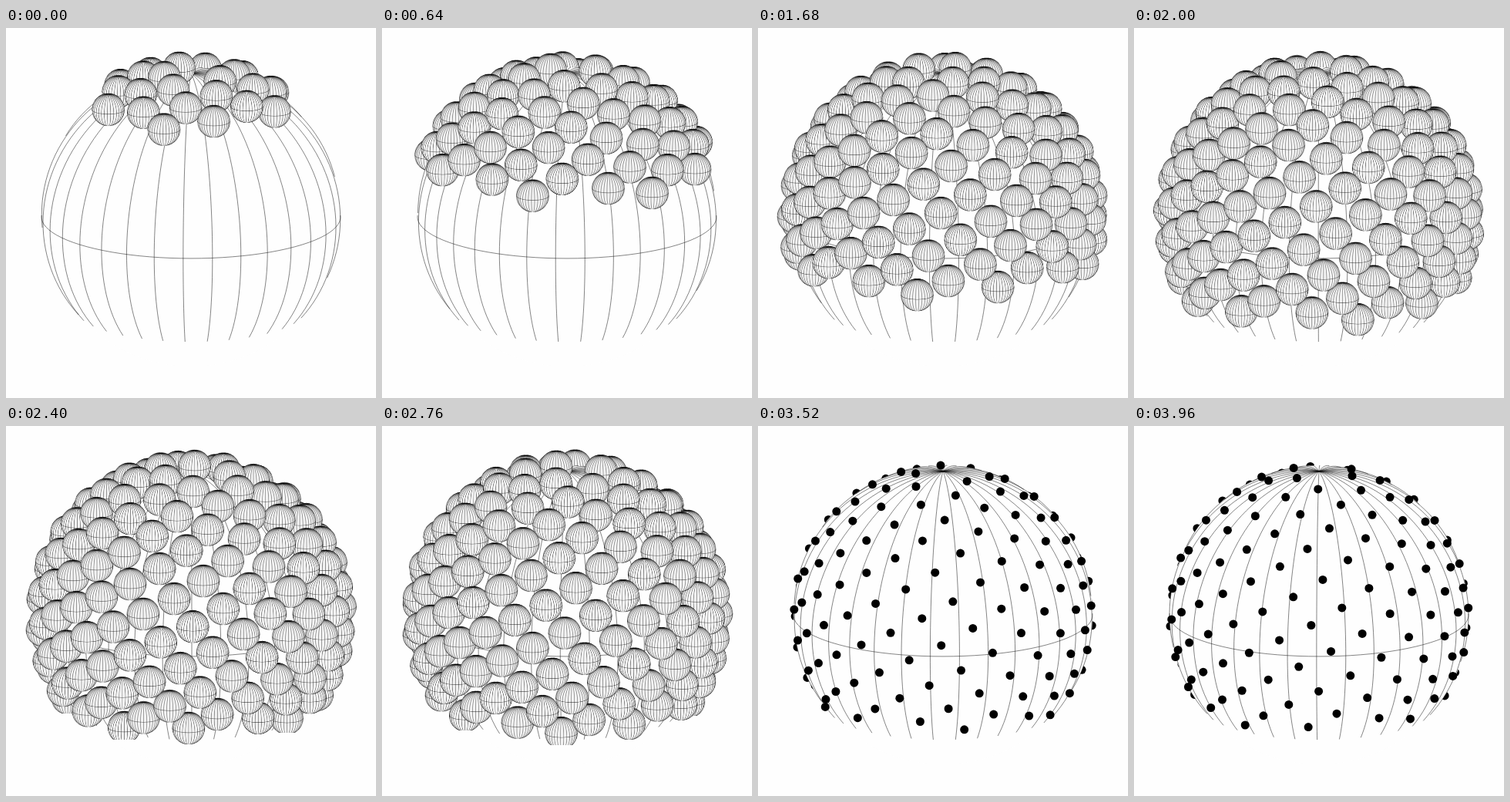
An HTML page with a canvas that plays this animation: 480 px wide and 480 px high, repeating every 4 s.

```html
<!DOCTYPE html>
<html lang="en">
<head>
<meta charset="utf-8">
<title>Golden-angle sphere</title>
<style>
  html, body { margin: 0; width: 100%; height: 100%; overflow: hidden; background: #fefefe; }
  canvas { display: block; width: 480px; height: 480px; }
</style>
</head>
<body>
<canvas id="stage" width="480" height="480"></canvas>
<script>
const ctx = document.getElementById('stage').getContext('2d');
const RAD = Math.PI / 180;
const STEP_MS = 40, STEPS = 100;
const GROWTH_END = 54, DOTS_FROM = 84;
const CX = 240, CY = 245, R = 194;
const BALL_R = 21, DOT_R = 5.5;
const GOLDEN = 137.508, TURN = 3.43;
const MERIDIANS = 32;
const CUT = -0.65;                       // height where the globe is sliced off
const RIM = -0.08;                       // depth up to which lines show past the outline
const SIN_TILT = 0.278, COS_TILT = Math.sqrt(1 - SIN_TILT ** 2);
const PAPER = '#fefefe';

// One ball is drawn per step and stamped at every seed.
const HALF = BALL_R + 1, SPRITE_SCALE = 2;
const sprite = document.createElement('canvas');
sprite.width = sprite.height = 2 * HALF * SPRITE_SCALE;
const spriteCtx = sprite.getContext('2d');

// Orthographic view of a unit-sphere point: height along the axis, longitude in degrees.
function project(height, lon) {
  const ring = Math.sqrt(Math.max(0, 1 - height * height));
  const side = ring * Math.sin(lon * RAD), front = ring * Math.cos(lon * RAD);
  return {
    x: side,
    y: front * SIN_TILT - height * COS_TILT,
    z: height * SIN_TILT + front * COS_TILT
  };
}

function strokeCurve(c, r, points) {
  let drawing = false;
  c.beginPath();
  for (const p of points) {
    const visible = p.z >= RIM;
    if (visible && drawing) c.lineTo(p.x * r, p.y * r);
    else if (visible) c.moveTo(p.x * r, p.y * r);
    drawing = visible;
  }
  c.stroke();
}

// Globe centred on 0,0; translucent lines add up to black where they crowd.
function drawGlobe(c, r, spin, lowest, fill, line, width) {
  c.fillStyle = fill;
  c.beginPath();
  c.arc(0, 0, r, 0, 2 * Math.PI);
  c.fill();

  c.strokeStyle = line;
  c.lineWidth = width;
  const lastLat = Math.asin(lowest) / RAD;
  for (let m = 0; m < MERIDIANS; m++) {
    const points = [];
    for (let i = 0; i <= 48; i++) {
      const lat = 90 + (lastLat - 90) * i / 48;
      points.push(project(Math.sin(lat * RAD), spin + m * 360 / MERIDIANS));
    }
    strokeCurve(c, r, points);
  }
  const equator = [];
  for (let lon = -92; lon <= 92; lon += 4) equator.push(project(0, lon));
  strokeCurve(c, r, equator);
}

function drawSprite(spin) {
  spriteCtx.setTransform(1, 0, 0, 1, 0, 0);
  spriteCtx.clearRect(0, 0, sprite.width, sprite.height);
  spriteCtx.setTransform(SPRITE_SCALE, 0, 0, SPRITE_SCALE, sprite.width / 2, sprite.height / 2);
  drawGlobe(spriteCtx, BALL_R, spin, -1, '#f4f4f4', 'rgba(0,0,0,.48)', 0.75);
}

// Seeds are pushed down from the pole, three per step, until the globe is full.
function seeds(step) {
  const pushed = 3 * Math.min(step, GROWTH_END);
  const list = [];
  for (let i = 3; i <= 28 + pushed; i++) {
    const height = 1 - (i - 1) / 119;
    const lon = (i - pushed) * GOLDEN + TURN * step + 230.4;
    list.push({ height, ...project(height, lon) });
  }
  return list.sort((a, b) => a.z - b.z);
}

function drawDot(seed) {
  ctx.fillStyle = '#000';
  ctx.beginPath();
  ctx.arc(CX + seed.x * R, CY + seed.y * R, DOT_R, 0, 2 * Math.PI);
  ctx.fill();
}

function drawBall(seed) {
  const r = BALL_R, drop = (CUT - seed.height) * R;
  let bottom = HALF;
  if (drop > -r) bottom = Math.sqrt(r * r - drop * drop) * SIN_TILT - drop * COS_TILT;
  const shown = HALF + Math.min(HALF, bottom);
  ctx.drawImage(sprite, 0, 0, sprite.width, shown * SPRITE_SCALE,
    CX + seed.x * R - HALF, CY + seed.y * R - HALF, 2 * HALF, shown);
}

function draw(step) {
  const spin = TURN * step - 3;
  const drawSeed = step < DOTS_FROM ? drawBall : drawDot;
  const all = seeds(step);
  drawSprite(spin);

  ctx.fillStyle = PAPER;
  ctx.fillRect(0, 0, 480, 480);
  all.filter(seed => seed.z < 0).forEach(drawSeed);
  ctx.save();
  ctx.translate(CX, CY);
  drawGlobe(ctx, R, spin, CUT, PAPER, 'rgba(0,0,0,.48)', 1);
  ctx.restore();
  all.filter(seed => seed.z >= 0).forEach(drawSeed);
}

const start = performance.now();
let current = -1;
function tick() {
  const step = Math.floor((performance.now() - start) / STEP_MS) % STEPS;
  if (step !== current) draw(current = step);
  requestAnimationFrame(tick);
}
tick();
</script>
</body>
</html>
```
